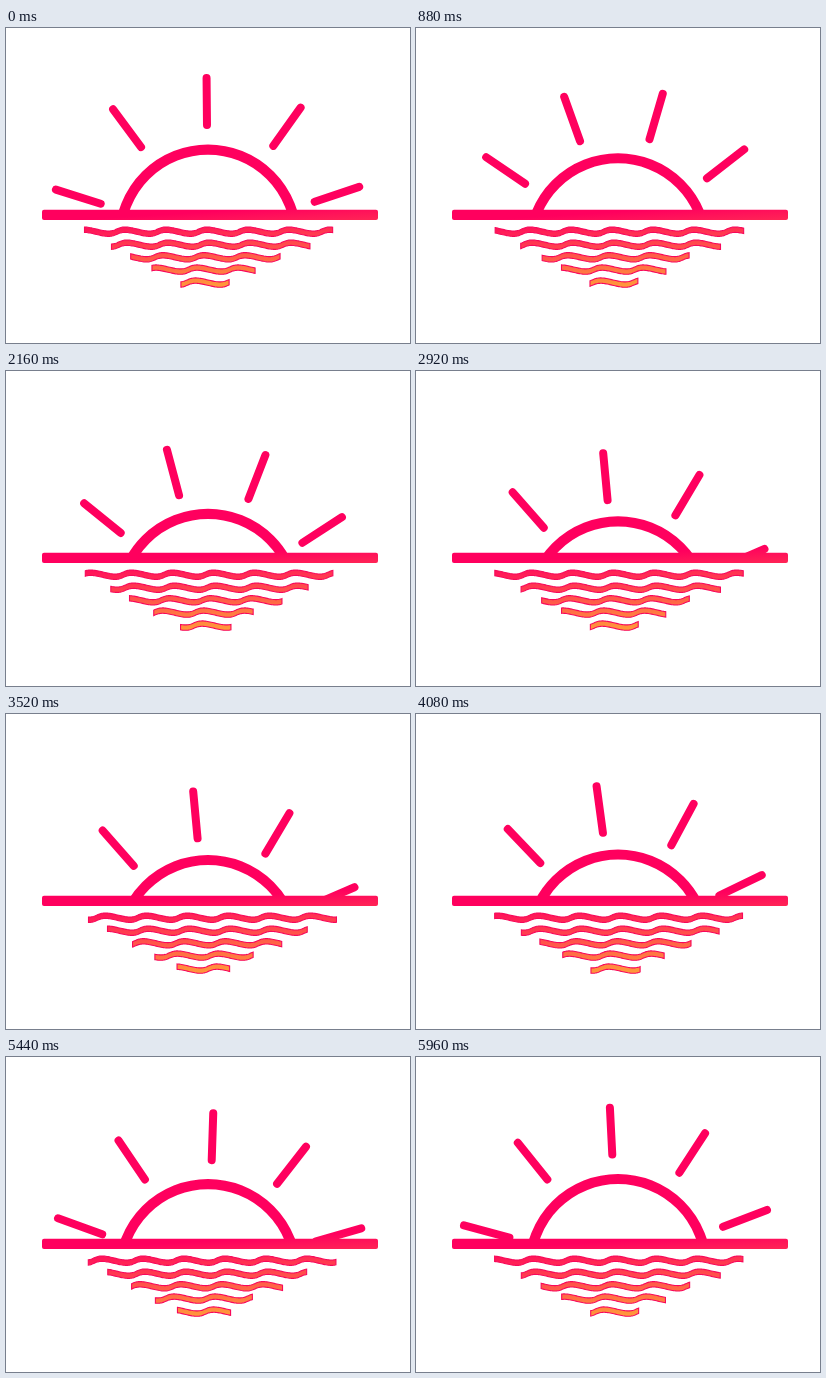
Recreate the animation shown at these times as an HTML page with a canvas. Size 404x315 px, loop 6000 ms.

```html
<!DOCTYPE html>
<html lang="en">
<head>
<meta charset="utf-8">
<title>Sunset</title>
<style>
  html, body { margin: 0; width: 100%; height: 100%; overflow: hidden; background: #fff; }
  canvas { display: block; }
</style>
</head>
<body>
<canvas width="404" height="315"></canvas>
<script>
const ctx = document.querySelector('canvas').getContext('2d');
const LOOP = 6000, STEP = 40, TAU = Math.PI * 2;
const CX = 202, HORIZON = 186, WAVELENGTH = 41;
const PINK = '#ff005e';

// left, right, centre y, crest offset
const rows = [
  [80.5, 328.5, 203.7, 39],
  [103.5, 302.5, 216.7, 41],
  [125.5, 275, 229.3, 36],
  [147.5, 248, 241.6, 29],
  [173, 223.5, 254.6, 27.5]
];

const paint = ctx.createLinearGradient(200, 184, 204.5, 259);
paint.addColorStop(0, PINK);
paint.addColorStop(1, '#ff9a3a');

function drawSun(t) {
  const sink = 1 - Math.abs(1 - 2 * t / LOOP);
  const discY = 209.6 + 29.5 * sink;
  const raysY = 209.5 + 32.5 * sink;
  const turn = t / LOOP * TAU - 0.009;
  ctx.save();
  ctx.beginPath();
  ctx.rect(0, 0, 404, HORIZON);
  ctx.clip();
  ctx.strokeStyle = paint;
  ctx.lineCap = 'round';

  ctx.lineWidth = 10.2;
  ctx.beginPath();
  ctx.arc(CX, discY, 88, 0, TAU);
  ctx.stroke();

  ctx.lineWidth = 8;
  ctx.beginPath();
  for (let i = 0; i < 10; i++) {
    const a = turn + i * TAU / 10, sx = Math.sin(a), sy = -Math.cos(a);
    ctx.moveTo(CX + 112.5 * sx, raysY + 112.5 * sy);
    ctx.lineTo(CX + 159.5 * sx, raysY + 159.5 * sy);
  }
  ctx.stroke();
  ctx.restore();
}

// A flat bar whose points are pushed up and left at each travelling crest.
function drawWave([left, right, y, crest], t) {
  const shift = crest + WAVELENGTH * t / 1000;
  const point = (x, edge) => {
    const h = Math.cos((x - shift) / WAVELENGTH * TAU);
    ctx.lineTo(x - 2 * h, y + edge - 2 * h);
  };
  ctx.beginPath();
  for (let x = left; x < right; x++) point(x, -2.7);
  point(right, -2.7);
  for (let x = right; x > left; x--) point(x, 2.7);
  point(left, 2.7);
  ctx.closePath();
  ctx.fillStyle = paint;
  ctx.fill();
  ctx.strokeStyle = '#f8085a';
  ctx.lineWidth = 1.1;
  ctx.stroke();
}

function draw() {
  const t = Math.floor(performance.now() % LOOP / STEP) * STEP;
  ctx.fillStyle = '#fff';
  ctx.fillRect(0, 0, 404, 315);
  drawSun(t);
  ctx.fillStyle = paint;
  ctx.beginPath();
  ctx.roundRect(36, 181.7, 336, 10.3, 2);
  ctx.fill();
  rows.forEach(row => drawWave(row, t));
  requestAnimationFrame(draw);
}
draw();
</script>
</body>
</html>
```
